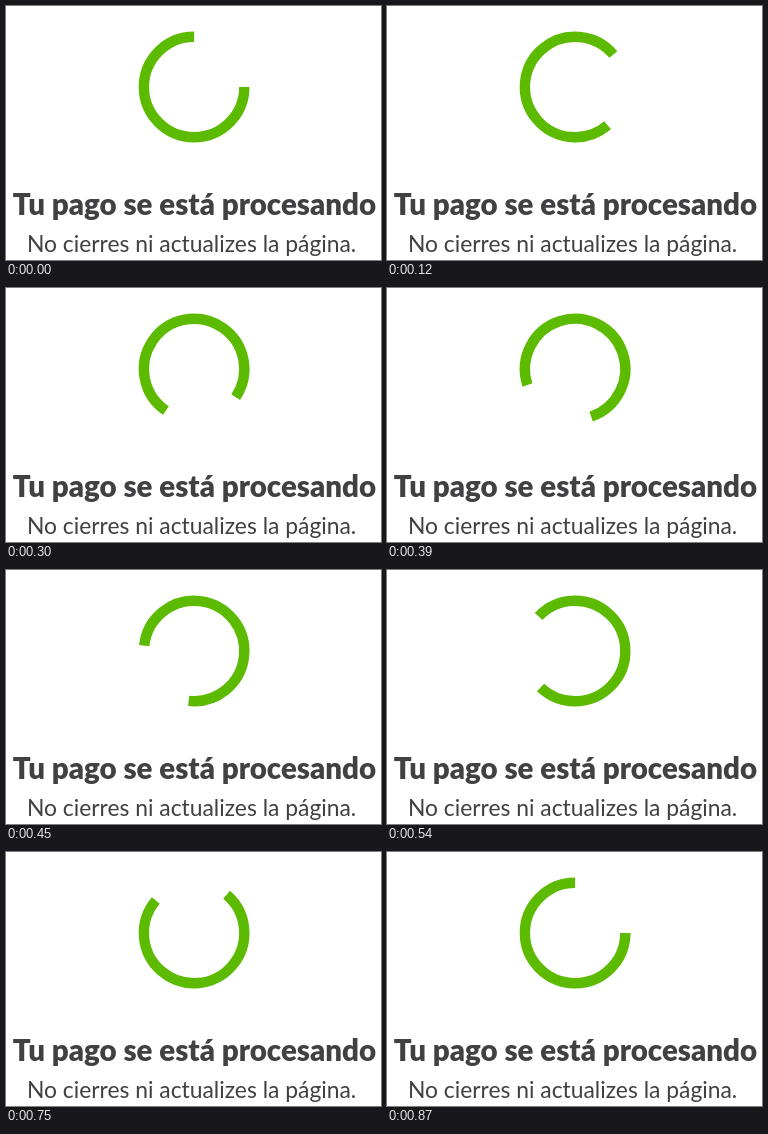
Recreate the animation shown at these times as an HTML page. Size 375 px wide and 254 px high, loop 900 ms.

```html
<!DOCTYPE html>
<html lang="es">
<head>
<meta charset="utf-8">
<title>Procesando</title>
<style>
  html, body { margin: 0; width: 100%; height: 100%; overflow: hidden; background: #fff; }
  svg { display: block; width: 375px; height: 254px; }
  text { font-family: Lato, sans-serif; fill: #414042; text-anchor: middle; }
  .title { font-size: 29.5px; font-weight: 900; }
  .note { font-size: 22.85px; }
  .ring { fill: none; stroke: #5cbb00; stroke-width: 10.4; }
</style>
</head>
<body>
<svg viewBox="0 0 375 254">
  <g transform="translate(188.1 81)">
    <path id="ring" class="ring" d="M50.2 0A50.2 50.2 0 1 1 0 -50.2"/>
  </g>
  <text class="title" x="188.4" y="209">Tu pago se está procesando</text>
  <text class="note" x="185.6" y="246">No cierres ni actualizes la página.</text>
</svg>
<script>
  const LOOP = 900, STEP = 30, TURNS = 29;
  const ring = document.getElementById('ring');
  const start = performance.now();

  // One full turn in 29 steps; the last pose equals the first.
  function draw(now) {
    const step = Math.floor((Math.max(0, now - start) % LOOP) / STEP);
    ring.setAttribute('transform', `rotate(${360 * step / TURNS})`);
    requestAnimationFrame(draw);
  }
  draw(start);
</script>
</body>
</html>
```
